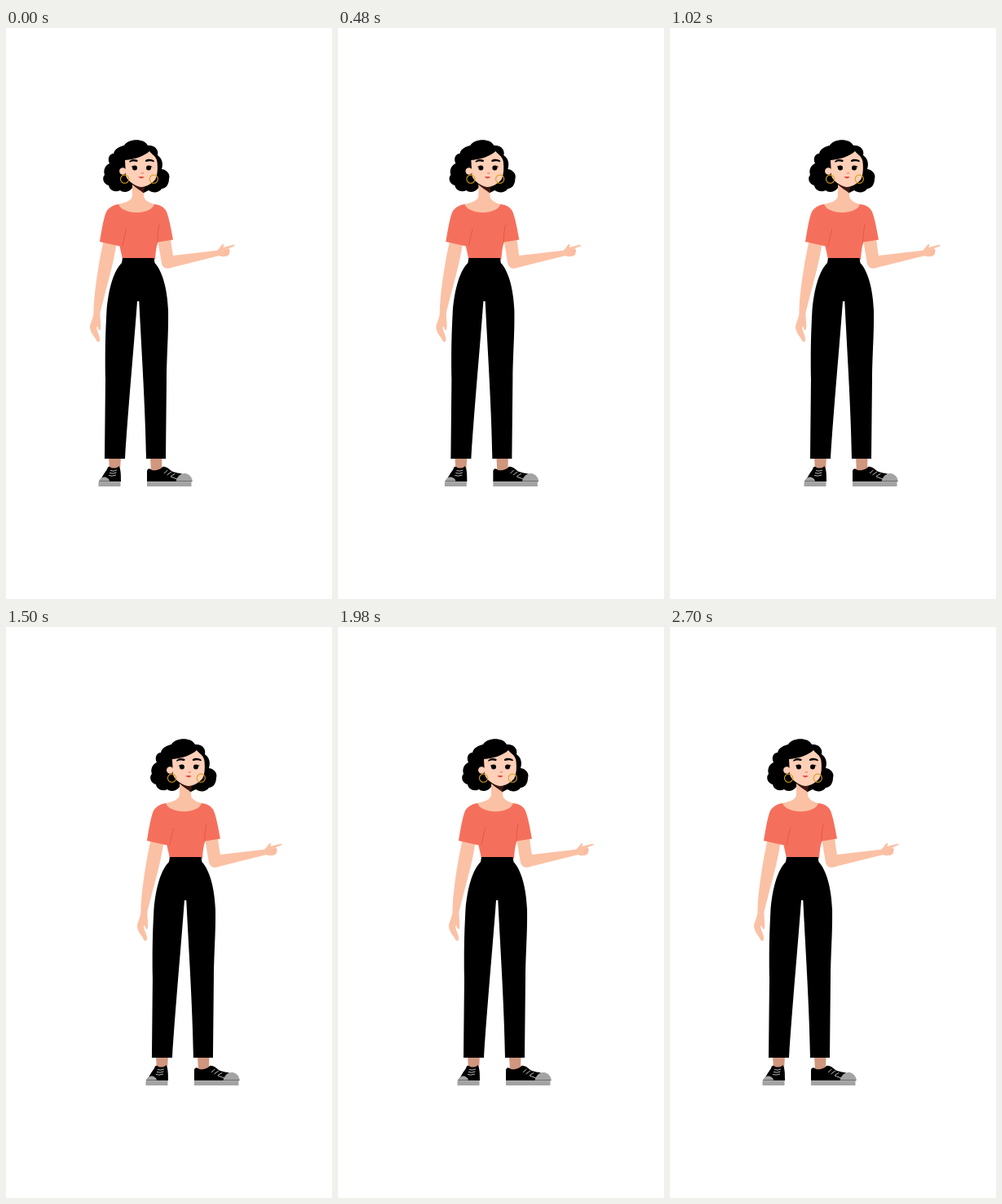
Write an HTML page with a canvas that moves like this. It is 400 px wide and 700 px high and loops after 2.73 s.

```html
<!DOCTYPE html>
<html lang="en">
<head>
<meta charset="utf-8">
<title>Pointing woman</title>
<style>
  html, body { margin: 0; width: 100%; height: 100%; overflow: hidden; background: #fff; }
  canvas { display: block; width: 400px; height: 700px; }
</style>
</head>
<body>
<canvas id="stage" width="400" height="700"></canvas>
<script>
const ctx = document.getElementById('stage').getContext('2d');
const LOOP = 2730, STEP = 30, HALF = 1350, TRAVEL = 60;
const SKIN = '#fbc1a5', FACE = '#ffcfb8', SHIRT = '#f5705c', FOLD = '#e8543f',
      BLACK = '#000', ANKLE = '#d0967e', SOLE = '#a3a3a3', GOLD = '#d9a21b';

function fill(path, color) {
  ctx.fillStyle = color;
  ctx.fill(new Path2D(path));
}

function stroke(path, color, width) {
  ctx.strokeStyle = color;
  ctx.lineWidth = width;
  ctx.stroke(new Path2D(path));
}

function disc(x, y, r, color) {
  ctx.fillStyle = color;
  ctx.beginPath();
  ctx.arc(x, y, r, 0, Math.PI * 2);
  ctx.fill();
}

function ring(x, y, r) {
  ctx.strokeStyle = GOLD;
  ctx.lineWidth = 1.1;
  ctx.beginPath();
  ctx.arc(x, y, r, 0, Math.PI * 2);
  ctx.stroke();
}

function drawHair() {
  fill(`M145 144 C149 136 169 134 174 144 C182 143 188 149 186 156 C192 160 193 167 191 173
    C198 174 202 180 200 185 C200 192 196 197 191 197 C188 202 180 203 175 199 L169 202 L155 196
    C151 202 143 202 140 199 C134 202 127 199 126 193 C120 192 117 184 121 180
    C119 174 122 168 127 166 C124 160 127 154 132 154 C133 148 140 145 145 144Z`, BLACK);
}

function drawNeck() {
  fill('M155 190 L169 190 L169 205 C169 211 175 214 182 216 C184 230 135 231 138 216 C146 214 155 212 155 205Z', SKIN);
  fill('M155 190 L171 190 L169 202.5 C165 199 159 196 155 192Z', '#3a1712');
}

function drawHead() {
  disc(143.3, 175.5, 4.2, FACE);
  fill(`M146 162 C158 161 170 157 176 151 C179 155 184 157 185.3 163 C186.5 171 186 181 183 186
    C179 191 171 195 166 195 C159 194 149 188 147 181Z`, FACE);
  fill('M151 163.8 C154 160.5 158 160.6 161.5 162 C162 163.4 161 164.3 159.5 164 C156 163 154 163.6 151.8 164.7Z', BLACK);
  fill('M171 162.3 C174 160 179 160.5 182 163 L181.4 164.3 C178 162.9 175 163.2 172.3 164 C171 164 170.6 163.4 171 162.3Z', BLACK);
  disc(158, 171.6, 3, BLACK);
  disc(175, 171.6, 3, BLACK);
  stroke('M154 170.2 L157 169.3 M176 169.3 L179.3 170.2', BLACK, 1);
  stroke('M165.8 177.6 Q167.5 178.7 168.8 177.3', '#e8785f', 1.1);
  fill('M162.3 182.6 Q165 181.6 166.5 182.2 Q168 181.8 169.5 182.7 Q166.5 186.3 162.3 182.6Z', '#df4a45');
  ring(145.6, 185.2, 5.1);
  ring(181.3, 185.2, 5.1);
}

function drawArms() {
  fill(`M120 260 L135.5 264 C133 285 124 315 115.5 349 C115 354 117 362 116 369
    C115 372 113 370 112.5 366 L111 367 C112 373 116 379 115 383 C114 386 111 385 110 381
    C107 377 103 372 103 366 C104 360 108 354 107.5 347 C108 325 114 285 120 260Z`, SKIN);
  fill(`M186 259 L202 258 C203 266 204 274 205 279 L259 272.8 C262 271 263 267 266 265
    C268 265 267 267 266.5 269 L279 265.8 C281 265.5 281 267 280 267.5 L272.8 270.2
    C275 271 275 273 274.3 275 C274 278 272 280 268 280 C265 281 262 279 260 279.4
    L204 293.5 C198 296 193 295 191 289Z`, SKIN);
  stroke('M268.5 274 L274 273.4 M268.5 277 L273.2 276.7', '#f3a88a', .6);
}

function drawShirt() {
  fill(`M138 216 C143 229.5 178 229.5 182 216 C191 217 196 221 198 228 C201 237 203 249 205 259.5
    L186.5 262.5 C184 269 183.5 276 183 284 L143 284 C142 278 140.5 273 139.5 267.5
    L115 262 C117 250 119 237 122 228 C124 221 131 217 138 216Z`, SHIRT);
  stroke('M148 246 C146 252 144.5 260 143 267.5 M188 241 C186.5 249 186 256 185.7 262.5', FOLD, .9);
}

function drawShoes() {
  fill('M126 526 H141 L140 542 H127Z M177 526 H191.5 L191 544 H178Z', ANKLE);

  fill('M116 556 C117 550 121 546 124 541 C125 537 127 537 129 539 C132 540 136 540 138.5 537 C141 541 141 548 141 556Z', BLACK);
  fill('M114 556 C115 552 119 549.5 123 551 C126 552 127 554 127 556Z M113.5 556.5 H140.5 V562 H113.5Z', SOLE);
  stroke('M114 555.8 H140.5', '#333', .7);
  stroke('M128 542.5 Q132 544 136 542 M127 545.5 Q131 547 135.5 545 M126 548.5 Q130 550 135 548', '#e8e8e8', .8);

  fill('M173 556 L173 543 C174 539 177 540 179 542 C184 543 190 541 192 538 C196 537 199 540 203 543 C208 546 213 545 217 547 L219 556Z', BLACK);
  fill('M208.5 556 C210 549 215 545.5 220 546 C226 547 228.5 552 229 556Z M173 556.5 H227.5 V562 H173Z', SOLE);
  stroke('M173 555.8 H228', '#333', .7);
  stroke('M194 546 L198.5 542 M197.5 548 L203 544 M202 549.5 L207.5 546.3 M202 550 L210 553', '#e8e8e8', .8);
}

function drawPants() {
  fill(`M143 282 H181.5 L182.5 288 C192 298 198 320 199 346 C199.5 375 197.5 395 197 430 L196 528
    H172 C171 465 166 390 163.3 335 H161 C157 390 150 465 146 528 H121
    L122 430 C121.5 395 122 375 123.5 346 C126 319 132 298 142 288Z`, BLACK);
}

function drawWoman() {
  drawHair();
  drawNeck();
  drawHead();
  drawArms();
  drawShirt();
  drawShoes();
  drawPants();
}

// Eases to the right for one half of the loop, then back.
function offsetAt(time) {
  const stepped = Math.floor((time % LOOP) / STEP) * STEP;
  const p = 1 - Math.abs(stepped - HALF) / HALF;
  return TRAVEL * p * p * (3 - 2 * p);
}

const start = performance.now();

function render() {
  const time = Math.max(0, performance.now() - start);
  ctx.setTransform(1, 0, 0, 1, 0, 0);
  ctx.fillStyle = '#fff';
  ctx.fillRect(0, 0, 400, 700);
  ctx.translate(offsetAt(time), 0);
  drawWoman();
  requestAnimationFrame(render);
}

render();
</script>
</body>
</html>
```
